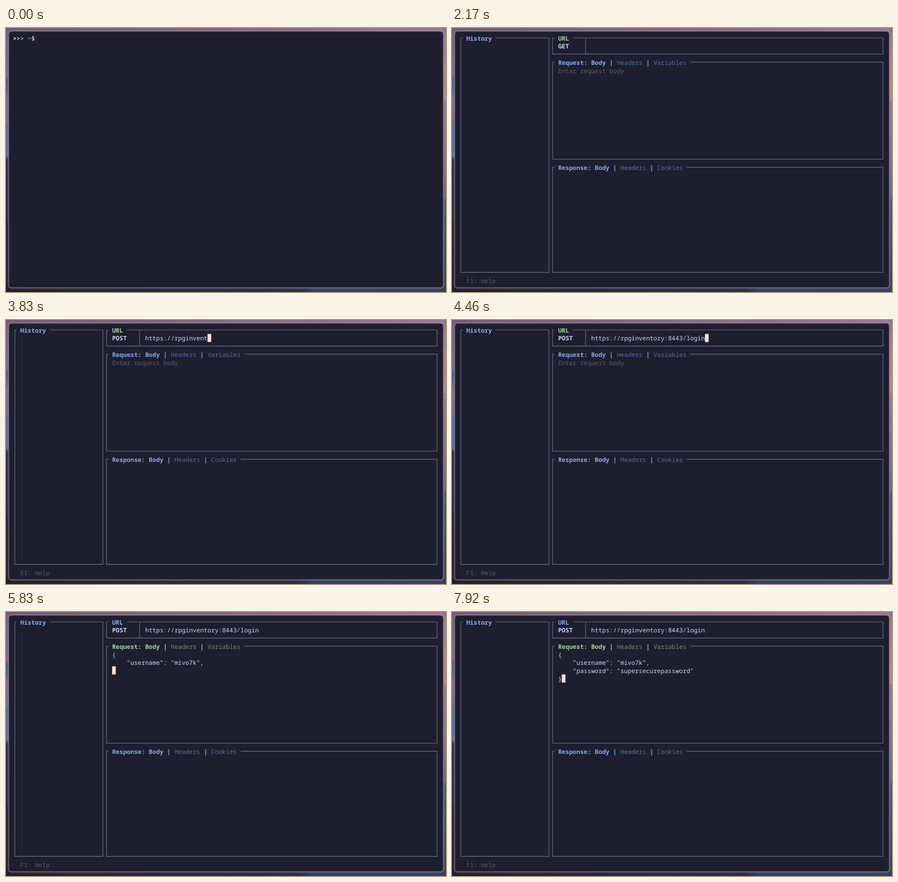
These frames come from a looping animation (800x480 px, 8000 ms). An HTML page:

```html
<!DOCTYPE html>
<html lang="en">
<head>
<meta charset="utf-8">
<title>Terminal request</title>
<style>
  html, body { margin: 0; width: 100%; height: 100%; overflow: hidden; background: #1e1e2e; }
  svg { display: block; width: 100vw; height: 100vh; }
  text {
    font: 500 11.125px "Noto Sans Mono", "DejaVu Sans Mono", monospace;
    white-space: pre;
    text-rendering: geometricPrecision;
  }
  .b { font-weight: 600; }
</style>
</head>
<body>
<svg id="stage" viewBox="0 0 800 480">
  <defs>
    <linearGradient id="left" x2="0" y2="1">
      <stop offset="0" stop-color="#765d73"/>
      <stop offset=".18" stop-color="#84647c"/>
      <stop offset=".2" stop-color="#50597a"/>
      <stop offset=".23" stop-color="#5d607f"/>
      <stop offset=".27" stop-color="#856883"/>
      <stop offset=".36" stop-color="#77677f"/>
      <stop offset=".365" stop-color="#596a92"/>
      <stop offset=".485" stop-color="#5d6c98"/>
      <stop offset=".5" stop-color="#2c2e40"/>
      <stop offset=".72" stop-color="#2a2938"/>
      <stop offset=".75" stop-color="#211e28"/>
      <stop offset="1" stop-color="#211e27"/>
    </linearGradient>
    <linearGradient id="right" x2="0" y2="1">
      <stop offset="0" stop-color="#936f8c"/>
      <stop offset=".14" stop-color="#b57f8e"/>
      <stop offset=".27" stop-color="#bd8790"/>
      <stop offset=".28" stop-color="#97788f"/>
      <stop offset=".45" stop-color="#7f7594"/>
      <stop offset=".64" stop-color="#66698f"/>
      <stop offset=".66" stop-color="#48587f"/>
      <stop offset="1" stop-color="#36425f"/>
    </linearGradient>
    <linearGradient id="top">
      <stop offset="0" stop-color="#735c72"/>
      <stop offset=".5" stop-color="#84677f"/>
      <stop offset="1" stop-color="#9c7691"/>
    </linearGradient>
    <linearGradient id="bottom">
      <stop offset="0" stop-color="#231f28"/>
      <stop offset=".35" stop-color="#27273a"/>
      <stop offset=".67" stop-color="#2b3046"/>
      <stop offset=".7" stop-color="#33405e"/>
      <stop offset="1" stop-color="#36425f"/>
    </linearGradient>
  </defs>
  <rect width="400" height="480" fill="url(#left)"/>
  <rect x="400" width="400" height="480" fill="url(#right)"/>
  <rect x="4" width="792" height="7" fill="url(#top)"/>
  <rect x="4" y="471" width="792" height="9" fill="url(#bottom)"/>
  <rect x="4" y="5" width="792" height="468" rx="6" fill="none" stroke="#aaa5b7" stroke-opacity=".25" stroke-width="3"/>
  <rect x="5" y="6" width="790" height="466" rx="5" fill="#1e1e2e" stroke="#797587"/>
  <g id="prompt"></g>
  <g id="app">
    <g id="frames" fill="none" stroke="#666980" stroke-width="1.2"></g>
    <g id="labels"></g>
    <rect id="cursor" width="6.675" height="14.7" fill="#f5e0dc"/>
    <text id="under" fill="#1e1e2e"></text>
  </g>
</svg>
<script>
const NS = "http://www.w3.org/2000/svg";
const $ = id => document.getElementById(id);
const LOOP = 8000, APP_AT = 1380, POST_AT = 2630, TYPE_AT = 3040, KEY = 46.55;
const BLUE = "#88aaec", BLUE_DIM = "#566fa5", GREEN = "#a3d69f", GREEN_DIM = "#6d9070";
const TEXT = "#cdd6f4", FAINT = "#585b70";

const address = "https://rpginventory:8443/login";
const body = `{
    "username": "mivo7k",
    "password": "supersecurepassword"
}`;

// Terminal cell to pixels
const px = col => 12.67 + col * 6.675;
const py = row => 18 + row * 14.7;

function add(parent, tag, attrs) {
  const el = document.createElementNS(NS, tag);
  for (const k in attrs) el.setAttribute(k, attrs[k]);
  return parent.appendChild(el);
}

function label(parent, col, row, str, fill, bold) {
  const el = add(parent, "text", { x: px(col), y: py(row) + 4.7, fill, class: bold ? "b" : "" });
  el.textContent = str;
  return el;
}

// Box with a gap in its top edge for the title
function box(c0, r0, c1, r1, titleLen) {
  const l = px(c0 + .5), r = px(c1 + .5), t = py(r0), b = py(r1);
  add($("frames"), "path", {
    d: `M${px(c0 + 1)} ${t}H${l}V${b}H${r}V${t}H${px(c0 + 3 + titleLen)}`
  });
}

// Title whose first tab is active, the others dimmed
function tabs(row, name, second, third) {
  const g = $("labels"), a = name.length + 3, b = a + second.length + 3;
  const bright = [
    label(g, 27, row, name + " |", BLUE, true),
    label(g, 27 + b - 2, row, "|", BLUE, true)
  ];
  const dim = [label(g, 27 + a, row, second, BLUE_DIM), label(g, 27 + b, row, third, BLUE_DIM)];
  box(25, row, 115, row === 3 ? 15 : 29, b + third.length);
  return focused => {
    bright.forEach(el => el.setAttribute("fill", focused ? GREEN : BLUE));
    dim.forEach(el => el.setAttribute("fill", focused ? GREEN_DIM : BLUE_DIM));
  };
}

[[0, ">", "#e4f0e4"], [1, ">", "#a6e3a1"], [2, ">", "#89b4fa"], [4, "~", "#b5a0c4"], [5, "$", "#e9b9d9"]]
  .forEach(([col, ch, fill]) => label($("prompt"), col, 0, ch, fill, true));

const g = $("labels");
box(0, 0, 24, 29, 7);
box(25, 0, 115, 2, 3);
add($("frames"), "path", { d: `M${px(34.5)} ${py(0)}V${py(2)}` });
label(g, 2, 0, "History", BLUE, true);
label(g, 2, 30, "F1: Help", FAINT);
const urlTitle = label(g, 27, 0, "URL", GREEN, true);
const method = label(g, 27, 1, "GET", TEXT, true);
const url = label(g, 36, 1, "", TEXT);
const focusRequest = tabs(3, "Request: Body", "Headers", "Variables");
tabs(16, "Response: Body", "Headers", "Cookies");
const hint = label(g, 27, 4, "Enter request body", FAINT);
const lines = body.split("\n").map((_, i) => label(g, 27, 4 + i, "", TEXT));

function show(el, on) {
  el.style.display = on ? "" : "none";
}

function draw(t) {
  show($("prompt"), t < APP_AT);
  show($("app"), t >= APP_AT);

  const keys = Math.max(0, Math.floor((t - TYPE_AT) / KEY) + 1);
  const inBody = keys > address.length;
  const typed = address.slice(0, keys);
  const rows = body.slice(0, Math.max(0, keys - address.length - 1)).split("\n");

  method.textContent = t < POST_AT ? "GET" : "POST";
  urlTitle.setAttribute("fill", inBody ? BLUE : GREEN);
  url.textContent = typed;
  focusRequest(inBody);
  lines.forEach((el, i) => el.textContent = rows[i] || "");

  const empty = rows.length === 1 && !rows[0];
  show(hint, empty);

  const last = rows.length - 1;
  const col = inBody ? 27 + rows[last].length : 36 + typed.length;
  const row = inBody ? 4 + last : 1;
  const cursor = $("cursor"), under = $("under");
  show(cursor, t >= POST_AT);
  cursor.setAttribute("x", px(col));
  cursor.setAttribute("y", py(row) - 7.35);
  under.setAttribute("x", px(col));
  under.setAttribute("y", py(row) + 4.7);
  under.textContent = inBody && empty ? "E" : "";
}

const start = performance.now();
function tick() {
  draw((performance.now() - start) % LOOP);
  requestAnimationFrame(tick);
}
tick();
</script>
</body>
</html>
```
